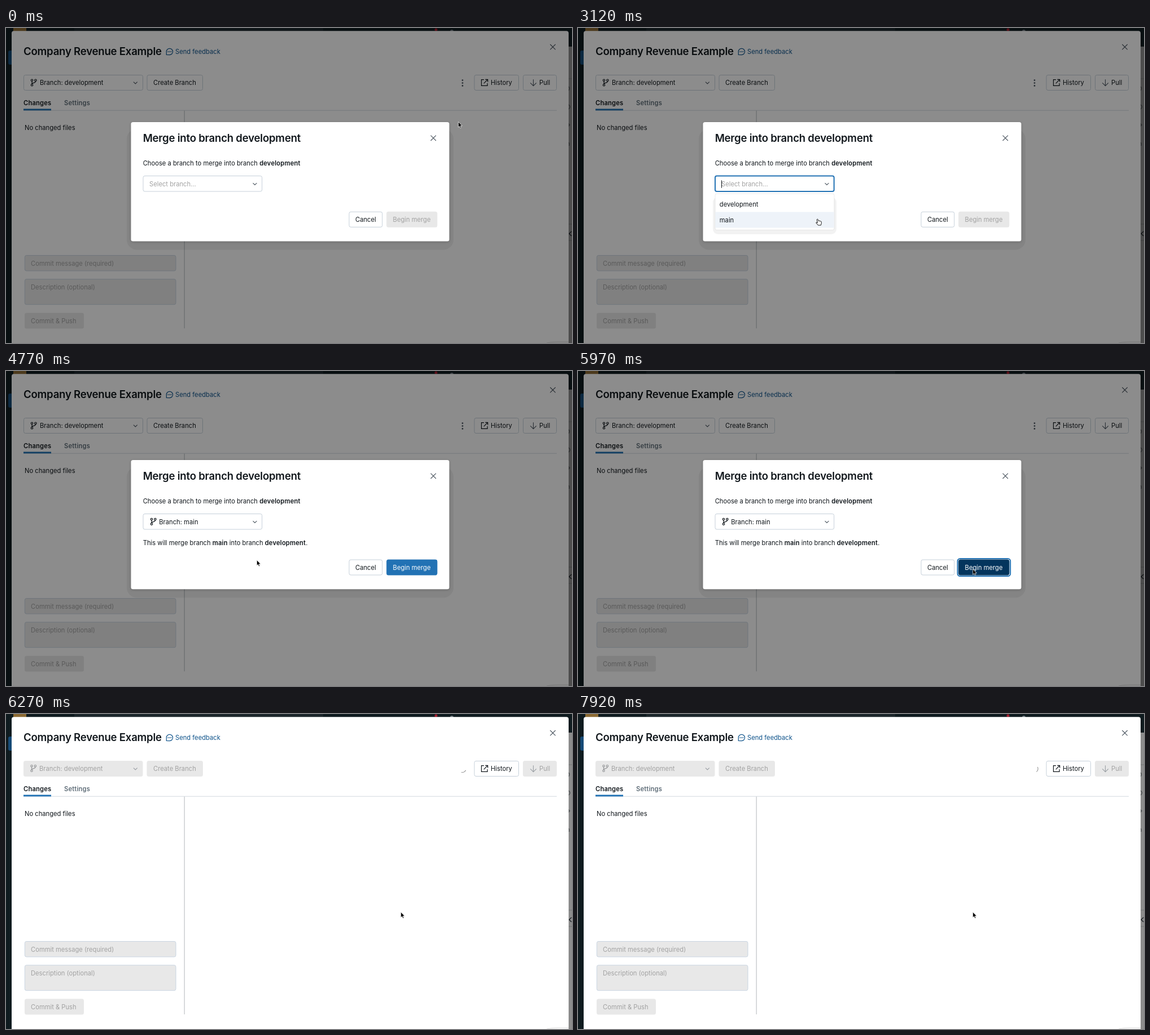
Recreate the animation shown at these times as an HTML page. Size 1003x559 px, loop 8000 ms.

```html
<!DOCTYPE html>
<html lang="en">
<head>
<meta charset="utf-8">
<title>Merge into branch</title>
<style>
html, body { margin: 0; width: 100%; height: 100%; overflow: hidden; background: #0f1b1f; }
svg { display: block; width: 1003px; height: 559px; }
text { font: 11.2px Inter, "Liberation Sans", sans-serif; fill: #11171c; white-space: pre; }
.title { font-size: 18.6px; font-weight: 600; letter-spacing: -.23px; }
.bold { font-weight: 600; letter-spacing: .18px; }
.muted { fill: #5f6d78; }
.faint text, text.faint { fill: #a2a2a2; }
.blue { fill: #0e538b; }
.line { fill: none; stroke: #11171c; stroke-width: 1.2; }
.thin { fill: none; stroke: #4c5660; stroke-width: 1.1; }
.box { fill: #fff; stroke: #c6d0da; }
.off { fill: #e8e8e8; }
.field { fill: #e8e8e8; stroke: #c9d5e2; }
#sheet { filter: drop-shadow(0 1px 2px rgba(0, 0, 0, .2)); }
</style>
</head>
<body>
<svg viewBox="0 0 1003 559">
  <defs>
    <g id="fork" class="line">
      <circle cx="-3" cy="-4.3" r="1.7"/><circle cx="3.4" cy="-4.3" r="1.7"/><circle cx="-3" cy="4.3" r="1.7"/>
      <path d="M-3-2.6v5.2M3.4-2.6C3.4 1.4-3-.6-3 2.6"/>
    </g>
    <path id="chevron" class="thin" d="M-3.4-1.7 0 1.7 3.4-1.7"/>
    <path id="cross" class="thin" d="M-4.7-4.7 4.7 4.7M4.7-4.7-4.7 4.7"/>
    <path id="down" class="thin" d="M0-6V5.2M-5.3 0 0 5.3 5.3 0"/>
  </defs>

  <!-- page behind the panel -->
  <rect width="1003" height="559" fill="#0f1b1f"/>
  <rect x="121" width="441" height="6" fill="#1c262b"/>
  <rect x="13" width="23" height="6" fill="#8c6a33"/>
  <circle cx="762" cy="3" r="2.5" fill="#a01c2c"/>
  <circle cx="790" cy="6" r="3" fill="#707a80"/>
  <rect x="4" y="40" width="12" height="25" rx="3" fill="#164a76"/>
  <rect x="990" y="33" width="13" height="526" fill="#8c8c8c"/>
  <g class="line" stroke-opacity=".55">
    <path d="M997 90h6M997 348h6M997 377h6" stroke-opacity=".2"/>
    <path d="M997 104q3 3 0 7M997 136q5 4 0 8M996 169l3 3-3 3M996 203q3 0 2 6"/>
    <path d="M1002 361l-4 4 4 4" stroke-opacity="1"/>
  </g>

  <!-- panel -->
  <path d="M10 559V9.3q0-4 4-4H993q4 0 4 4V559z" fill="#fff"/>
  <path d="M958 559q8-2 20-2h19" fill="none" stroke="#d8d8d8"/>
  <text class="title" x="31" y="47.8">Company Revenue Example</text>
  <path d="M284.3 47.5V42a5.6 5.6 0 1 1 5.6 5.6z" fill="none" stroke="#0e538b" stroke-width="1.2"/>
  <path d="M286.5 42h1.6m1 0h1.6m1 0h1.6" stroke="#0e538b" stroke-width="1.5"/>
  <text class="blue" x="300" y="46">Send feedback</text>
  <use href="#cross" x="969" y="33.7"/>

  <g id="ready">
    <rect class="box" x="31.5" y="83.5" width="211" height="27" rx="3"/>
    <use href="#fork" x="49" y="97"/>
    <text x="60" y="101.3">Branch: development</text>
    <use href="#chevron" x="229.3" y="97.3"/>
    <rect class="box" x="250" y="83.5" width="98.5" height="27" rx="3"/>
    <text x="261" y="101.3">Create Branch</text>
    <g fill="#4c5660"><circle cx="809" cy="92.7" r="1.4"/><circle cx="809" cy="97.6" r="1.4"/><circle cx="809" cy="102.5" r="1.4"/></g>
    <rect class="box" x="916.5" y="83.5" width="59" height="27" rx="3"/>
    <use href="#down" x="934.5" y="97.3"/>
    <text x="945" y="101.3">Pull</text>
  </g>
  <g id="busy" class="faint">
    <rect class="off" x="31" y="83" width="211.5" height="28" rx="3.5"/>
    <use href="#fork" x="48.5" y="96.5" opacity=".38"/>
    <use href="#chevron" x="229.3" y="97.3" opacity=".5"/>
    <text x="59" y="101">Branch: development</text>
    <rect class="off" x="249.5" y="83" width="99.5" height="28" rx="3.5"/>
    <text x="261" y="101.3">Create Branch</text>
    <path id="spinner" d="M4.8-4.4A6.5 6.5 0 0 1 4.8 4.4" fill="none" stroke="#8a8a8a"/>
    <rect class="off" x="916" y="83" width="60" height="28" rx="3.5"/>
    <use href="#down" x="934.5" y="97.3" opacity=".5"/>
    <text x="945" y="101.3">Pull</text>
  </g>

  <rect class="box" x="830" y="83.5" width="78.5" height="27" rx="3"/>
  <path class="line" d="M847 91.7h-4.5v10.6h10.6V98M849.3 91.3h4.4v4.4M853.5 91.5l-6.8 6.8"/>
  <text x="859" y="101">History</text>

  <text class="bold" x="31" y="136.8">Changes</text>
  <text class="bold muted" x="103" y="136.8">Settings</text>
  <path d="M31 146.2H976" stroke="#d3d9df"/>
  <rect x="31" y="143.4" width="49" height="2.9" fill="#2272b4"/>
  <path d="M316.2 146.5V533" stroke="#bfc3c7" stroke-width="1.2"/>
  <text x="33" y="181">No changed files</text>
  <rect class="field" x="33.3" y="403.5" width="267.7" height="27.5" rx="3"/>
  <text class="faint" x="44" y="421.5">Commit message (required)</text>
  <rect class="field" x="33.3" y="445.7" width="267.7" height="45" rx="3"/>
  <text class="faint" x="44" y="464">Description (optional)</text>
  <rect class="off" x="33" y="505.5" width="105" height="28" rx="3.5"/>
  <text class="faint" x="44" y="523.8">Commit &amp; Push</text>

  <rect id="mask" width="1003" height="559"/>

  <g id="modal">
    <rect id="shade" x="214" y="12" width="579" rx="18" fill-opacity=".06"/>
    <rect id="sheet" x="221.5" width="564" rx="3.5" fill="#fff"/>
    <text class="title" x="242.7" y="35.3">Merge into branch development</text>
    <use href="#cross" x="757.3" y="28.3"/>
    <text x="242.7" y="77">Choose a branch to merge into branch <tspan class="bold">development</tspan></text>
    <rect id="select" class="box" x="243" y="95.5" width="210.7" height="27.5" rx="3"/>
    <use href="#chevron" x="441" y="109.8"/>
    <text id="hint" class="faint" x="254" y="113.7">Select branch...</text>
    <path id="caret" d="M254.5 103.3v13.5" stroke="#11171c"/>
    <g id="chosen">
      <use href="#fork" x="261" y="109.3"/>
      <text x="271.3" y="113.7">Branch: main</text>
      <text x="242.7" y="151">This will merge branch <tspan class="bold">main</tspan> into branch <tspan class="bold">development</tspan>.</text>
    </g>
    <g id="actions">
      <rect class="box" x="608" y=".5" width="58.8" height="27" rx="3"/>
      <text x="619" y="18.2">Cancel</text>
      <rect id="ring" x="672.6" y="-1.6" width="93.6" height="31.2" rx="4.5" fill="none" stroke="#2272b4" stroke-width="2"/>
      <rect id="begin" x="674.2" width="90.2" height="28" rx="3.5"/>
      <text id="beginText" x="685.6" y="18.2">Begin merge</text>
    </g>
    <g id="menu">
      <rect x="239" y="133" width="219" height="66" rx="9" fill-opacity=".05"/>
      <rect x="243" y="127" width="211" height="64.5" rx="3" fill="#fff" stroke="#000" stroke-opacity=".1" stroke-width=".8"/>
      <rect x="243.3" y="159.5" width="210.4" height="28" fill="#eef3f9"/>
      <text x="250.8" y="149.8">development</text>
      <text x="250.8" y="178">main</text>
    </g>
  </g>

  <path id="arrow" d="M0 0V9.7L2.2 7.7 3.7 11.1 5.3 10.4 3.9 7.1H6.9z" stroke="#fff" stroke-width=".7"/>
  <path id="hand" fill="#fff" stroke="#000" stroke-width=".9" stroke-linejoin="round"
    d="M-1 .8Q0-.8 1 .8L2 3.5Q3 2.6 3.7 3.6 5 2.8 5.4 4.1 7 3.7 7 5.4V7.6Q6.8 9 6 11H1.2Q0 9-2.3 7.2-2.8 5.8-1.3 5.8L.2 6.8z"/>
</svg>
<script>
const $ = id => document.getElementById(id);
const show = (id, on) => $(id).style.display = on ? '' : 'none';
const set = (id, attrs) => { for (const key in attrs) $(id).setAttribute(key, attrs[key]); };
const run = (start, count) => Array.from({ length: count }, (_, i) => start + 150 * i);

const LOOP = 8000;
const stops = [0, ...run(150, 7), 1190, 1340, 1930, 2080, 2680, 2830, 2980, 3120, 3720,
  ...run(4770, 6), ...run(5820, 15)];

function glide(t, from, to, [x0, y0], [x1, y1]) {
  const p = Math.min(1, Math.max(0, (t - from) / (to - from)));
  const e = p * p * (3 - 2 * p);
  return [x0 + (x1 - x0) * e, y0 + (y1 - y0) * e];
}

function pointer(t) {
  if (t < 1340) return glide(t, 0, 1190, [801.5, 166.5], [432, 291]);
  if (t < 3720) return glide(t, 2530, 3120, [429, 284], [424.3, 339]);
  return glide(t, 4620, 5520, [424, 334.3], [699.7, 351.5]);
}

function draw(t) {
  const picked = t >= 3720, open = t < 6120;
  const focused = t >= 1340 && !picked;
  const pressed = t >= 5820;
  const top = picked ? 158 : 167, height = picked ? 229.3 : 211.5;

  show('ready', open);
  show('busy', !open);
  show('modal', open);
  set('mask', { 'fill-opacity': open ? .45 : t < 6270 ? .145 : 0 });
  set('spinner', { transform: `translate(808.7 97.2) rotate(${5 + (t - 6120) * 360 / 890})` });

  set('modal', { transform: `translate(0 ${top})` });
  set('sheet', { height });
  set('shade', { height: height + 3 });
  set('actions', { transform: `translate(0 ${picked ? 176.5 : 158.8})` });
  $('select').style.stroke = focused ? '#2272b4' : '';
  $('select').style.strokeWidth = focused ? 2 : 1;
  show('hint', !picked);
  show('chosen', picked);
  show('caret', focused && (t < 2080 || t >= 2830));

  show('menu', t >= 1930 && !picked);
  const opening = t < 2080;
  set('menu', {
    opacity: opening ? .5 : 1,
    transform: opening ? 'translate(0 12.7) scale(1 .9)' : ''
  });

  const [x, y] = pointer(t);
  const hover = picked && x > 674;
  set('begin', { fill: pressed ? '#04355d' : hover ? '#0e538b' : picked ? '#2272b4' : '#e8e8e8' });
  $('beginText').style.fill = picked ? '#fff' : '#a2a2a2';
  show('ring', pressed);

  show('hand', focused);
  show('arrow', !focused);
  set(focused ? 'hand' : 'arrow', { transform: `translate(${x} ${y})` });
}

function frame() {
  const t = performance.now() % LOOP;
  draw(stops.filter(s => s <= t).pop());
  requestAnimationFrame(frame);
}
frame();
</script>
</body>
</html>
```
